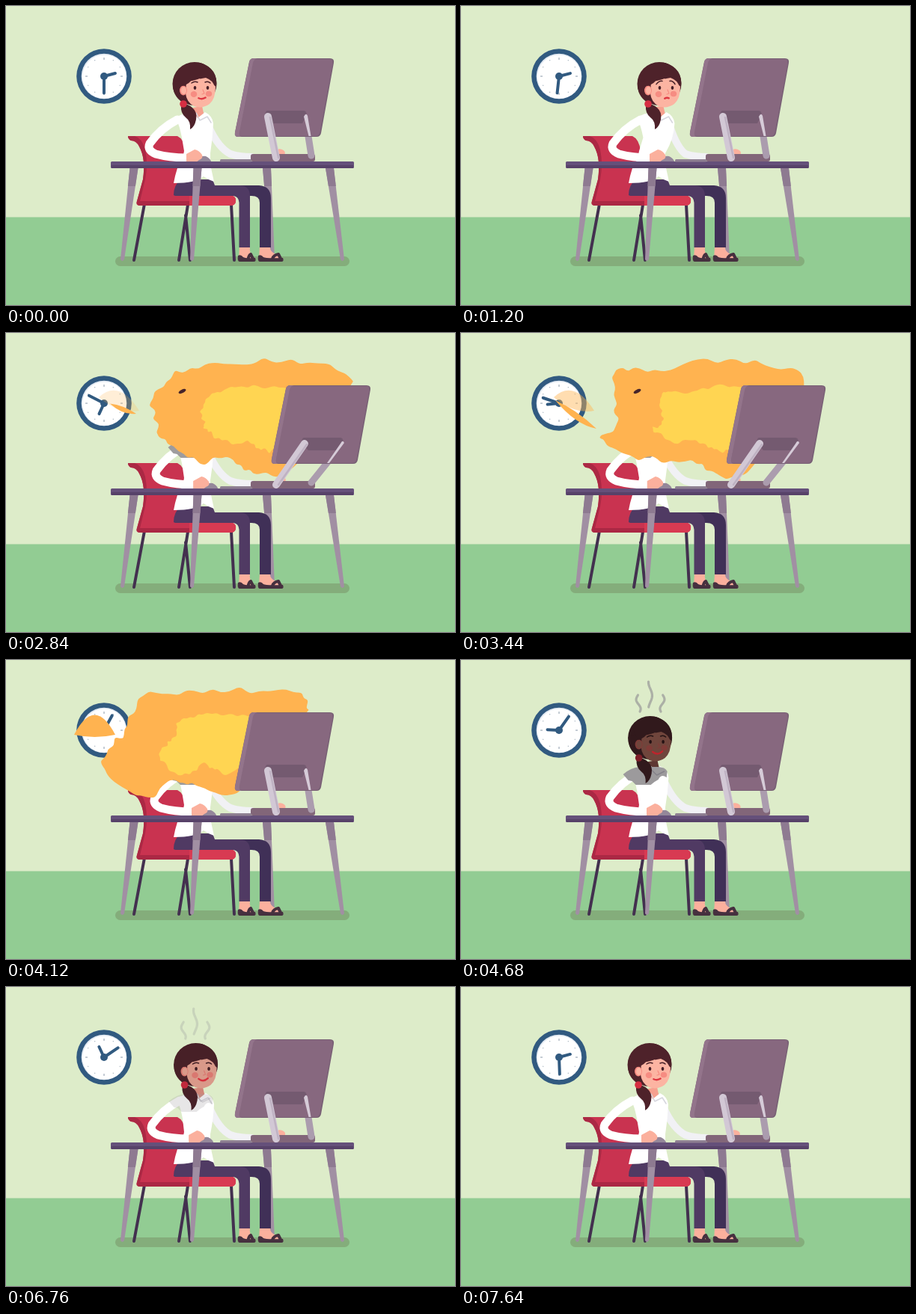
An HTML page with a canvas for the animation above (7680 ms loop, 600 by 400 pixels).

```html
<!DOCTYPE html>
<html lang="en">
<head>
<meta charset="utf-8">
<title>Burning screen</title>
<style>
html, body { margin: 0; width: 100%; height: 100%; overflow: hidden; background: #ddecc9; }
canvas { display: block; width: 600px; height: 400px; }
</style>
</head>
<body>
<canvas id="stage" width="600" height="400"></canvas>
<script>
const ctx = document.getElementById('stage').getContext('2d');
const LOOP = 7680;

const clamp = v => Math.max(0, Math.min(1, v));
const mix = (a, b, u) => a + (b - a) * u;
const span = (t, a, b) => { const u = clamp((t - a) / (b - a)); return u * u * (3 - 2 * u); };
const tint = (a, b, u) => `rgb(${a.map((v, i) => Math.round(mix(v, b[i], u)))})`;
const rnd = i => { const v = Math.sin(i * 127.1 + 11.7) * 43758.5453; return v - Math.floor(v); };

function fill(d, color) { ctx.fillStyle = color; ctx.fill(new Path2D(d)); }
function line(d, color, width, cap = 'round') {
  ctx.strokeStyle = color; ctx.lineWidth = width; ctx.lineCap = cap; ctx.lineJoin = 'round';
  ctx.stroke(new Path2D(d));
}
function oval(x, y, rx, ry, color, rot = 0) {
  ctx.fillStyle = color; ctx.beginPath(); ctx.ellipse(x, y, rx, ry, rot, 0, 7); ctx.fill();
}
function box(x, y, w, h, r, color) {
  ctx.fillStyle = color; ctx.beginPath(); ctx.roundRect(x, y, w, h, r); ctx.fill();
}
function shifted(x, y, draw) { ctx.save(); ctx.translate(x, y); draw(); ctx.restore(); }

// ---- motion ----
const headShift = t => 13 * span(t, 0, 1200) - 13 * span(t, 1700, 3000)
  + 3 * span(t, 4300, 5600) - 3 * span(t, 5900, LOOP);
const armShift = t => 11 * span(t, 0, 1200) - 4 * span(t, 1700, 4100) - 7 * span(t, 5720, LOOP);

function screenShift(t) {
  const open = span(t, 1600, 1740) - span(t, 3740, 4000);
  return open * (49 + 5 * Math.sin((t - 2240) * Math.PI / 200));
}

// Minutes past noon: a rush to 9:06, then on round to 2:30.
function minutes(t) {
  if (t < 6050) return 150 + 396 / (1 + Math.exp((2681 - t) / 249));
  const p = (t - 6050) / (LOOP - 6050);
  return 546 + 324 * (p < .5 ? 2 * p * p : 1 - 2 * (1 - p) ** 2);
}

// ---- room ----
function room() {
  ctx.fillStyle = '#ddecc9'; ctx.fillRect(0, 0, 600, 400);
  ctx.fillStyle = '#92cc93'; ctx.fillRect(0, 282.5, 600, 118);
  box(146, 335, 313, 13, 6.5, '#84ad7b');
}

function clock(t) {
  const m = minutes(t);
  oval(131, 94, 36.8, 36.8, '#315a80');
  oval(131, 94, 30.3, 30.3, '#e3eaf2');
  oval(131.4, 94.6, 29.2, 29.2, '#ffffff');
  shifted(131, 94, () => {
    for (let i = 0; i < 12; i++) {
      line(`M0 -25V-${i % 3 ? 24 : 22}`, '#8a9aaa', 1, 'butt');
      ctx.rotate(Math.PI / 6);
    }
    const hand = (angle, len) => {
      ctx.save(); ctx.rotate(angle); line(`M0 0V-${len}`, '#315a80', 4); ctx.restore();
    };
    hand(m / 720 * 2 * Math.PI, 15.5);
    hand(m / 60 * 2 * Math.PI, 22.5);
    oval(0, 0, 5, 5, '#315a80');
  });
}

function chair() {
  line('M185 265L171 340M243 266L231 340M240 280L246 340', '#43304f', 4);
  line('M301 266L305 340', '#43304f', 4);
  fill('M163 174H229Q238 178 240 194L246 254H303Q308 256 307 262Q306 267 300 267H178Q173 266 175 261L183 232Q187 204 178 188Q174 180 167 180Q163 178 163 174Z', '#c93350');
  fill('M163 174H172Q182 177 186 192Q190 212 186 232L179 261H245V267H178Q173 266 175 261L183 232Q187 204 178 188Q174 180 167 180Q163 178 163 174Z', '#ab2844');
  fill('M245 254H303Q308 256 307 262Q306 267 300 267H245Z', '#d83a52');
}

function tableLeg(x1, x2) {
  fill(`M${x1 - 5.5} 217H${x1 + 5.5}L${x2 + 2.5} 339Q${x2} 343 ${x2 - 2.5} 339Z`, '#a18fa3');
  const x = mix(x1, x2, .2);
  fill(`M${x1 - 5.5} 217H${x1 + 5.5}L${x + 5} 241H${x - 5}Z`, '#8e7a91');
}

function foot(x, w) {
  fill(`M${x + 1} 322H${x + 15}Q${x + 14} 330 ${x + w - 5} 334L${x + w - 2} 339H${x}Z`, '#fbb09d');
  fill(`M${x - 1} 334Q${x + 3} 332 ${x + 6} 336Q${x + 9} 338 ${x + w - 1} 337Q${x + w + 1} 342 ${x + w - 3} 342H${x + 1}Q${x - 2} 342 ${x - 1} 334Z`, '#46303f');
  line(`M${x + w * .55} 338Q${x + w * .6} 333 ${x + w - 7} 332L${x + w - 4} 338`, '#46303f', 4);
}

function legs() {
  foot(338, 33);
  fill('M300 240H338Q354 241 354 257V323H339V263Q339 254 328 254H300Z', '#403057');
  foot(311, 23);
  fill('M224 253Q224 240 233 232H276L279 240H313Q326 241 326 254V323H311.5V263Q311 255 304 254H226Z', '#503a63');
}

// ---- woman ----
function torso(head, burn) {
  const s = head * .65, a = 234 + s, b = 272 + s;
  fill(`M250 136L${262 + s} 134L${266 + s} 152L${250 + s} 152Z`, tint([246, 160, 143], [94, 56, 50], burn));
  line(`M${b - 1} 162Q${284 + s * .6} 190 300 198Q312 202 328 202`, '#f1f1f5', 10);
  fill(`M${a - 7} 150Q${a} 143 ${a + 17} 142L${a + 22} 150L${a + 32} 142Q${b + 4} 147 ${b + 5} 157Q${b + 4} 178 273 197V212Q276 226 278 235Q271 233 264 228Q254 237 224 237Q226 226 229 217Q236 208 238 194L${a + 1} 176Q${a - 2} 160 ${a - 7} 150Z`, '#ffffff');
  line(`M${a + 20} 143L${a + 25} 153L${a + 35} 148L${a + 40} 156`, '#d7d7de', 1.6);
}

function arm(dx) {
  shifted(dx, 0, () => {
    line('M229 152Q206 164 192 184Q188 193 200 198Q218 203 242 203', '#ffffff', 11);
    fill('M256 205Q260 200 267 201Q273 204 274 208H255Z', '#94879a');
    fill('M241 198L252 192Q258 193 262 199Q264 204 258 206L254 209H241Z', '#fbb09d');
  });
}

function soot(head, burn) {
  if (burn <= 0) return;
  ctx.globalAlpha = burn;
  shifted(head - 3, 0, () => {
    fill('M219 153Q229 144 241 143H262Q275 142 278 149L277 157Q270 152 266 160L261 163L256 167H236L231 162L226 161Z', '#9c9a9c');
    line('M258 148L264 154L274 149', '#85828a', 1.5);
  });
  ctx.globalAlpha = 1;
}

function headShape(dx, t, burn) {
  const hair = tint([78, 34, 42], [49, 25, 28], burn);
  const skin = tint([252, 180, 162], [112, 69, 60], burn);
  const cheek = tint([246, 140, 130], [128, 60, 56], burn);
  const dark = tint([70, 32, 40], [36, 18, 20], burn);
  const worry = span(t, 500, 1100) * (1 - span(t, 4100, 4300));
  const smile = span(t, 4100, 4300) * (1 - span(t, 6500, 7400));
  shifted(dx, 0, () => {
    fill('M234 134Q240 128 249 136Q256 142 254 152Q252 162 246 165Q247 154 240 149Q233 143 234 134Z', hair);
    oval(252, 104, 29.5, 29, hair);
    fill('M223 103Q222 120 236 129L246 122L240 96Z', hair);
    fill('M241 101Q258 100 266 92Q277 95 280 108Q280 124 272 131Q262 138 251 134Q241 128 240 117Z', skin);
    oval(237, 113, 5, 6.5, cheek);
    oval(237.5, 113, 3.6, 5, skin);
    fill('M236 107Q246 104 251 95Q268 99 281 108Q284 84 260 76Q234 74 229 92Z', hair);
    fill('M246 104Q256 97 267 96Q276 99 279 108Q271 113 250 113Z', skin);
    oval(237, 131, 4.8, 4.8, tint([214, 46, 66], [126, 30, 40], burn));
    oval(251, 118, 4.3, 4, cheek);
    oval(271, 117.5, 4.2, 3.8, cheek);
    oval(252.5, 109.5, 1.8, 2.4, dark);
    oval(269.5, 109.5, 1.8, 2.4, dark);
    const b = worry * 1.6;
    line(`M248 ${103 + b}Q252 ${100 - b * .2} 256 ${102 - b}`, dark, 1.5);
    line(`M266 ${102 - b}Q270 ${100 - b * .2} 273 ${103 + b}`, dark, 1.5);
    line('M263 112L265 117L262 118', cheek, 1.2);
    const w = 4.6 - worry * 1.8 + smile * 2, c = 2 - worry * 3.5 + smile * 3;
    line(`M${262 - w} ${123.5 - c * .15}Q262 ${123.5 + c} ${262 + w} ${123 - c * .2}`, tint([222, 55, 66], [190, 36, 44], burn), 2.4);
  });
}

function smoke(t) {
  const a = span(t, 4500, 4800) * (1 - span(t, 6400, 6950));
  if (!a) return;
  ctx.globalAlpha = a;
  for (let i = 0; i < 3; i++) {
    const tall = i === 1, top = tall ? 29 : 47, end = tall ? 63 : 69;
    let d = '';
    for (let u = 0; u <= 1; u += 1 / 14) {
      const sway = Math.sin(u * 6 + (t - 5720) / 170 + i * 1.6 + 2.8) * 2.5;
      d += `${u ? 'L' : 'M'}${238 + i * 15 + sway + (i - 1) * 2 * (1 - u)} ${mix(top, end, u)}`;
    }
    line(d, '#929194', 3.2);
  }
  ctx.globalAlpha = 1;
}

// ---- fire: a few hull points per pose, with a ragged flickering edge ----
const hulls = [
  '464,68 405,41 333,34 254,43 222,70 183,94 193,124 238,150 264,172 305,171 335,186 372,181',
  '460,69 403,41 330,39 258,50 211,50 206,90 210,124 186,139 238,168 300,170 340,189 390,180',
  '402,70 375,43 300,40 230,43 178,52 164,90 142,115 130,149 183,186 228,161 259,171 308,175'
].map(s => s.split(' ').map(p => p.split(',').map(Number)));

function hullAt(t) {
  const late = t > 3440;
  const a = hulls[late ? 1 : 0], b = hulls[late ? 2 : 1];
  const u = late ? span(t, 3440, 4120) : span(t, 2240, 3440);
  return a.map((p, i) => p.map((v, k) => mix(v, b[i][k], u)));
}

const toward = (list, cx, cy, kx, ky = kx) =>
  list.map(([x, y]) => [cx + (x - cx) * kx, cy + (y - cy) * ky]);

const spline = (p, a, b, c, u) =>
  a + .5 * u * (b - p + u * (2 * p - 5 * a + 4 * b - c + u * (3 * (a - b) + c - p)));

function blaze(hull, color, amp, t, seed) {
  const n = hull.length, steps = 6, edge = [];
  for (let i = 0; i < n * steps; i++) {
    const j = Math.floor(i / steps), u = i % steps / steps;
    const [p, a, b, c] = [-1, 0, 1, 2].map(k => hull[(j + k + n) % n]);
    const len = Math.hypot(b[0] - a[0], b[1] - a[1]) || 1;
    const out = amp * (.4 + rnd(i + seed)) * Math.sin(t / 65 + 6.3 * rnd(i * 3 + seed));
    edge.push([
      spline(p[0], a[0], b[0], c[0], u) + out * (b[1] - a[1]) / len,
      spline(p[1], a[1], b[1], c[1], u) - out * (b[0] - a[0]) / len
    ]);
  }
  ctx.fillStyle = color;
  ctx.beginPath();
  edge.forEach(([x, y], i) => {
    const [nx, ny] = edge[(i + 1) % edge.length];
    ctx.quadraticCurveTo(x, y, mix(x, nx, .6), mix(y, ny, .6));
  });
  ctx.fill();
}

// Tapered lick of fire from root to tip, bulging upwards.
function lick(x1, y1, x2, y2, rise, drop) {
  const mx = (x1 + x2) / 2, my = (y1 + y2) / 2;
  fill(`M${x1} ${y1}Q${mx} ${my - rise} ${x2} ${y2}Q${mx} ${my + drop} ${x1} ${y1}Z`, '#ffb350');
}

function licks(t) {
  const a = span(t, 2240, 3440), b = span(t, 3440, 4120);
  const out = 1 - span(t, 4120, 4500);
  if (t < 2120 || !out) return;
  const x2 = mix(mix(152, 126, a), 91, b), y2 = mix(mix(99, 90, a), 100, b);
  const x1 = mix(mix(167, 181, a), 146, b), y1 = mix(mix(88, 128, a), 100, b);
  lick(mix(x2, x1, out), y1, x2, y2, (mix(3, 7, a) + 46 * b) * out, (mix(4, 14, a) - 8 * b) * out);
  ctx.globalAlpha = .45 * a * (1 - b);
  lick(124, 86, 178, 104, 34, 14);
  ctx.globalAlpha = 1;
}

function flame(t) {
  const END = 4600;
  if (t < 1540 || t > END) return;
  let hull = hullAt(t);
  hull = toward(hull, mix(340, 390, span(t, 1600, 1800)), 110, mix(.12, 1, span(t, 1540, 2000)));
  const left = 1 - clamp((t - 4120) / (END - 4120));
  hull = toward(hull, 72, 88, left ** 1.3, left);
  const size = span(t, 1540, 2000) * left;
  licks(t);
  blaze(hull, '#ffb350', 4.5 * size, t, 0);
  if (t > 2060 && t < 3700) oval(235.5, 78, 5.4, 2.3, '#46242a', -.45);
  const cx = mix(345, 305, span(t, 3440, 4120));
  blaze(toward(hull, mix(72, cx, left), mix(88, 115, left), .56), '#ffd552', 3 * size, t, 40);
}

// ---- desk ----
function monitor(s) {
  box(327, 198, 86, 10, 3, '#826679');
  line(`M${400 + s} 149L408 200`, '#ab9cae', 9);
  shifted(s, 0, () => {
    fill('M331 70H433Q439 70 438 76L421 170Q420 175 415 175H310Q305 175 306 169L325 75Q326 70 331 70Z', '#786075');
    fill('M334 71H433Q437 71 436.5 77L419.5 169Q418 174 414 174H315Q311 174 312 169L329 76Q330 71 334 71Z', '#87687f');
    fill('M331 70H336Q331 71 330 76L312 169Q311 174 315 175H310Q305 175 306 169L325 75Q326 70 331 70Z', '#93748b');
    fill('M349 140H398Q403 141 401 147L396 157H355L346 147Q346 141 349 140Z', '#745a70');
  });
  const x = 401 + s, foot = mix(x, 408, .5);
  fill(`M${x - 3} 148Q${x} 142 ${x + 2} 147L${foot + 3} 174H${foot}Z`, '#d6cbd8');
  line(`M${350 + s} 148L361 203`, '#d2c8d5', 10);
  line(`M${353 + s} 149L364 203`, '#bfb2c3', 2.5);
}

function desk() {
  box(140, 208, 325, 9, 1.5, '#65507a');
  ctx.fillStyle = '#574269'; ctx.fillRect(141, 213, 323, 4);
  tableLeg(256, 248.5);
  tableLeg(432.5, 449.5);
  box(286, 205, 42, 3.5, 1.5, '#8f8092');
}

function frame(t) {
  const head = headShift(t), dx = armShift(t);
  const burn = span(t, 2300, 2900) * (1 - span(t, 5950, 7150));
  room();
  clock(t);
  tableLeg(171, 155.5);
  tableLeg(348.5, 356.5);
  chair();
  legs();
  torso(head, burn);
  arm(dx);
  soot(head, burn);
  headShape(head, t, burn);
  smoke(t);
  oval(367 + dx * .1, 195.5, 6, 4, '#fbb09d', .3);
  flame(t);
  monitor(screenShift(t));
  desk();
}

const start = performance.now();
function tick() {
  frame((performance.now() - start) % LOOP);
  requestAnimationFrame(tick);
}
tick();
</script>
</body>
</html>
```
